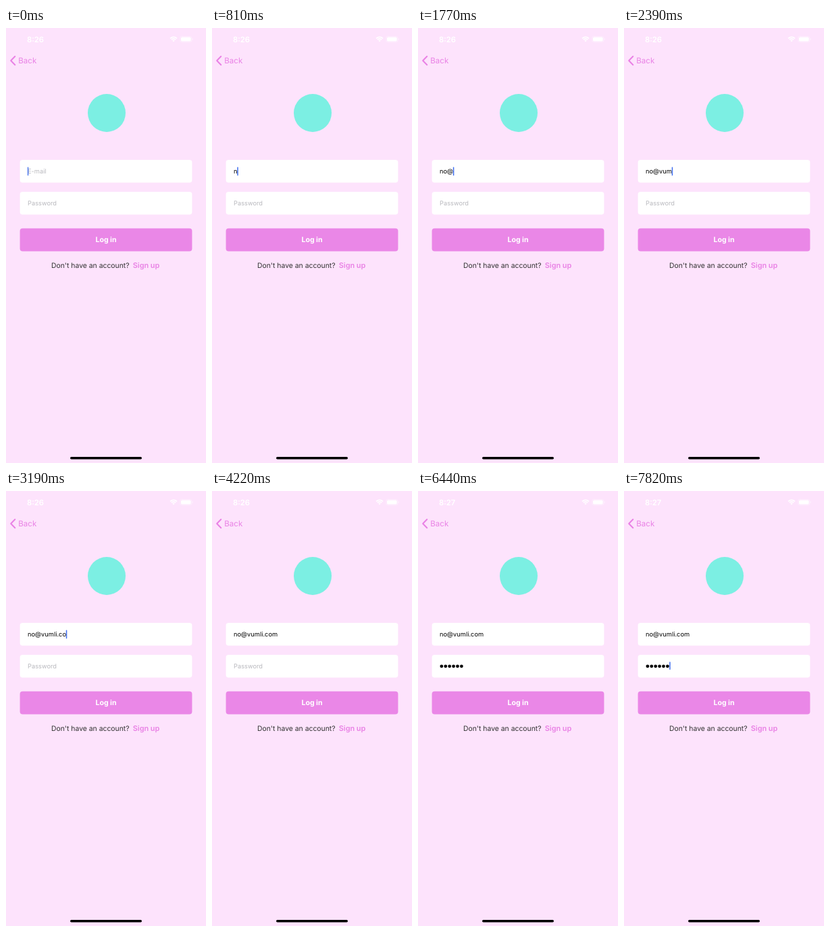
These frames come from a looping animation (296 by 640 pixels, 8 s). An HTML page with a canvas:

```html
<!DOCTYPE html>
<html lang="en">
<head>
<meta charset="utf-8">
<title>Log in</title>
<style>
  html, body { margin: 0; width: 100%; height: 100%; overflow: hidden; background: #fde3fc; }
  canvas { display: block; width: 296px; height: 640px; }
</style>
</head>
<body>
<canvas id="stage"></canvas>
<script>
const W = 296, H = 640, LOOP = 8000;
const PINK = '#e982e5', BLUE = '#3f6eee', HINT = '#b9b9be';
const FIELD_X = 32, FIELD_SIZE = 9.3, DOT_STEP = 5.9;

// The address is typed in bursts with an even key rhythm.
const BURSTS = [{ at: 810, keys: 'no' }, { at: 1770, keys: '@' }, { at: 2120, keys: 'vumli' }, { at: 2920, keys: '.com' }];
const KEY_TIME = 135;
const SUGGEST = { from: 1190, to: 1770 };
const FOCUS_PASSWORD = 3590;
const PASSWORD = { at: 4630, first: 2, length: 6, keyTime: 300 };
const MINUTE_TURN = 5830;
const BLINK = 1020, IDLE_AT_START = 490;

const canvas = document.getElementById('stage');
const ctx = canvas.getContext('2d');
const scale = window.devicePixelRatio || 1;
canvas.width = W * scale;
canvas.height = H * scale;

const clamp = (v, lo, hi) => Math.min(hi, Math.max(lo, v));

function text(str, x, y, size, color, weight = 400) {
  ctx.font = `${weight} ${size}px Inter, Roboto, sans-serif`;
  ctx.fillStyle = color;
  ctx.fillText(str, x, y);
}

function box(x, y, w, h, radius, color) {
  ctx.beginPath();
  ctx.roundRect(x, y, w, h, radius);
  ctx.fillStyle = color;
  ctx.fill();
}

function outline(x, y, w, h, radius, color, width) {
  ctx.beginPath();
  ctx.roundRect(x, y, w, h, radius);
  ctx.strokeStyle = color;
  ctx.lineWidth = width;
  ctx.stroke();
}

function disc(x, y, r, color) {
  ctx.beginPath();
  ctx.arc(x, y, r, 0, Math.PI * 2);
  ctx.fillStyle = color;
  ctx.fill();
}

function line(points, color, width) {
  ctx.beginPath();
  points.forEach(([x, y]) => ctx.lineTo(x, y));
  ctx.strokeStyle = color;
  ctx.lineWidth = width;
  ctx.stroke();
}

function fan(x, y) {
  const up = -Math.PI / 2, spread = Math.PI / 4;
  ctx.strokeStyle = ctx.fillStyle = '#fff';
  ctx.lineWidth = 1.6;
  ctx.lineCap = 'butt';
  for (const r of [4.4, 7]) {
    ctx.beginPath();
    ctx.arc(x, y, r, up - spread, up + spread);
    ctx.stroke();
  }
  ctx.beginPath();
  ctx.moveTo(x, y);
  ctx.arc(x, y, 2.5, up - spread, up + spread);
  ctx.fill();
}

function statusBar(t) {
  text(t < MINUTE_TURN ? '8:26' : '8:27', 31, 21, 11.3, '#fff', 600);
  fan(248, 20.3);
  outline(257.8, 12.4, 17, 8.2, 2.4, 'rgba(255,255,255,0.45)', 0.8);
  box(259, 13.6, 14.6, 5.8, 1.5, '#fff');
  box(275.6, 15.1, 1, 2.8, 0.5, 'rgba(255,255,255,0.5)');
}

function page() {
  ctx.fillStyle = '#fde3fc';
  ctx.fillRect(0, 0, W, H);

  ctx.lineCap = ctx.lineJoin = 'round';
  line([[13.3, 41.8], [7.2, 48], [13.3, 54.2]], PINK, 2);
  text('Back', 18.2, 52, 11.6, PINK);

  disc(149, 125, 28, '#7cefe3');

  for (const y of [194, 241]) box(20.6, y, 254.8, 33.5, 4, '#fff');
  box(20.6, 294.8, 254.8, 33.6, 4, '#ea87e7');

  ctx.textAlign = 'center';
  text('Log in', 148, 315, 10.6, '#fff', 700);
  ctx.textAlign = 'left';
  text("Don't have an account?", 67, 353, 10.4, '#333');
  text('Sign up', 187.7, 353, 10.9, PINK, 600);

  box(95, 631, 106, 3.4, 1.7, '#000');
}

function suggestion() {
  const corners = [2, 7.5, 7.5, 2];
  box(30, 218.3, 26.5, 15, corners, '#fff');
  outline(30, 218.3, 26.5, 15, corners, '#d3ccd6', 0.7);
  text('on', FIELD_X, 229, FIELD_SIZE, '#147efb');
  const x = 48, y = 225.8, r = 2.8;
  for (const s of [-1, 1]) line([[x - r, y - s * r], [x + r, y + s * r]], HINT, 0.8);
}

// Typed text, dot count and the time of the last key at time t.
function typing(t) {
  let typed = '', lastKey = -IDLE_AT_START;
  for (const { at, keys } of BURSTS) {
    const count = clamp(Math.floor((t - at) / KEY_TIME) + 1, 0, keys.length);
    typed += keys.slice(0, count);
    if (count) lastKey = at + (count - 1) * KEY_TIME;
  }
  if (t >= FOCUS_PASSWORD) lastKey = FOCUS_PASSWORD;

  let dots = 0;
  if (t >= PASSWORD.at) {
    dots = Math.min(PASSWORD.length, PASSWORD.first + Math.floor((t - PASSWORD.at) / PASSWORD.keyTime));
    lastKey = PASSWORD.at + (dots - PASSWORD.first) * PASSWORD.keyTime;
  }
  return { typed, dots, lastKey };
}

// Solid after a key, then a short fade out and in again each period.
function caretAlpha(idle) {
  const fromDark = Math.abs(idle % BLINK - 700);
  return clamp((fromDark - 100) / 120, 0, 1);
}

function form(t) {
  const { typed, dots, lastKey } = typing(t);
  const suggesting = t >= SUGGEST.from && t < SUGGEST.to;
  const onPassword = t >= FOCUS_PASSWORD;

  if (suggesting) box(30, 204, 14, 14, 0, '#cbdcf0');
  text(typed || 'E-mail', FIELD_X, 214, FIELD_SIZE, typed ? '#000' : HINT);
  const typedWidth = ctx.measureText(typed).width;

  if (!dots) text('Password', FIELD_X, 261, FIELD_SIZE, HINT);
  for (let i = 0; i < dots; i++) disc(34.9 + i * DOT_STEP, 257.8, 2.4, '#000');

  if (suggesting) suggestion();

  const offset = onPassword ? dots * DOT_STEP : typedWidth;
  ctx.globalAlpha = caretAlpha(t - lastKey);
  box(FIELD_X - 0.2 + offset, onPassword ? 251.3 : 204.4, 1.5, onPassword ? 11.6 : 12.8, 0.7, BLUE);
  ctx.globalAlpha = 1;
}

const begin = performance.now();

function draw() {
  const t = (performance.now() - begin) % LOOP;
  ctx.setTransform(scale, 0, 0, scale, 0, 0);
  ctx.textRendering = 'geometricPrecision';
  page();
  statusBar(t);
  form(t);
  requestAnimationFrame(draw);
}

draw();
</script>
</body>
</html>
```
